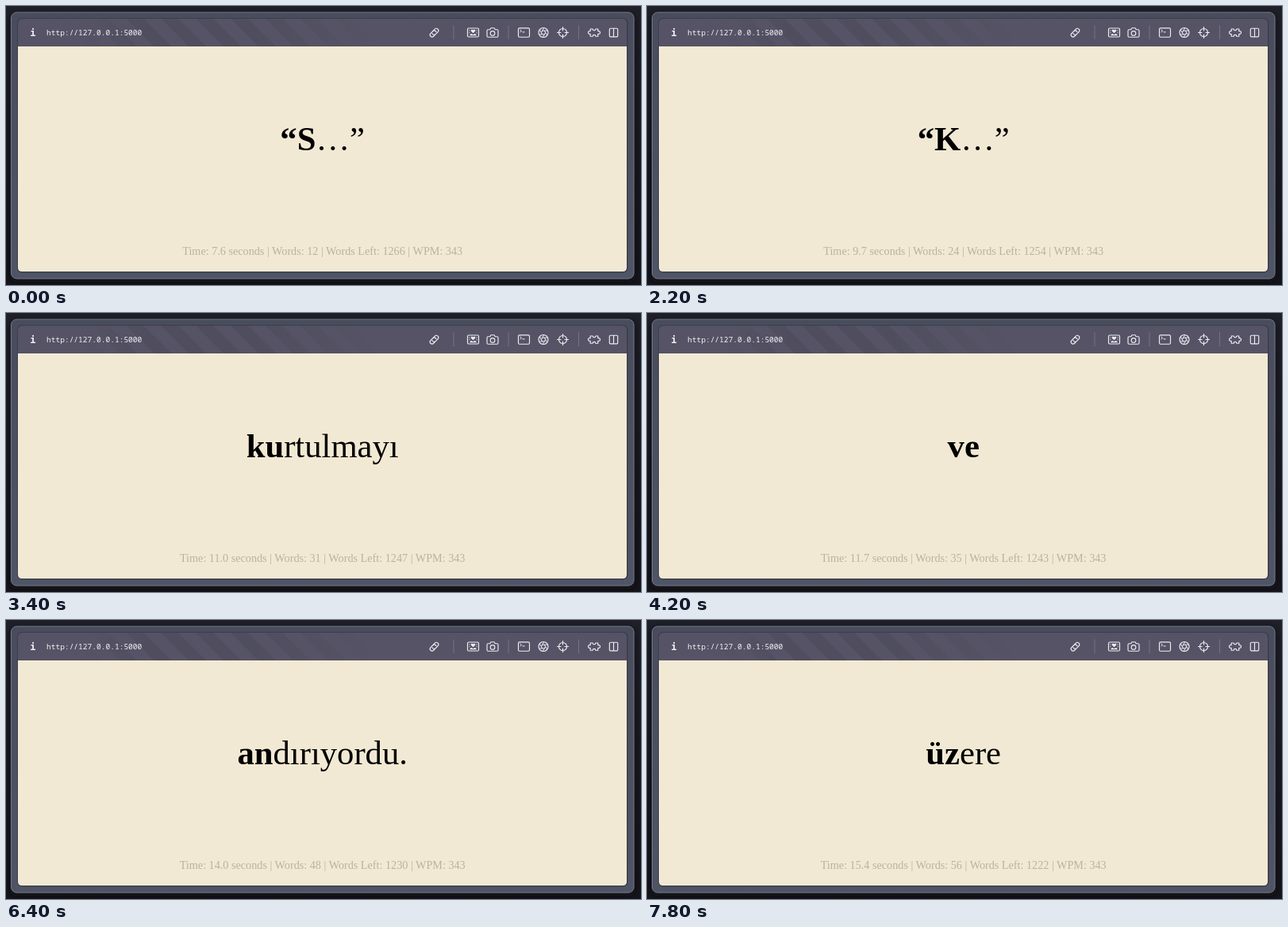
Write an HTML page that moves like this. It is 800x352 px and loops after 8000 ms.

```html
<!DOCTYPE html>
<html lang="tr">
<head>
<meta charset="utf-8">
<title>Speed reader</title>
<style>
html, body { margin: 0; width: 100%; height: 100%; overflow: hidden; background: #1b1b23; }
svg { display: block; width: 800px; height: 352px; }
.serif { font-family: "Liberation Serif", "Times New Roman", Times, serif; text-anchor: middle; }
.mono { font-family: "Noto Sans Mono", "DejaVu Sans Mono", monospace; fill: #f4f3f8; }
.bold { font-weight: 700; }
.icons { fill: none; stroke: #eeedf4; stroke-width: 1.15; stroke-linecap: round; stroke-linejoin: round; }
.solid { fill: #eeedf4; stroke: none; }
</style>
</head>
<body>
<svg viewBox="0 0 800 352">
  <defs>
    <linearGradient id="back" x2="0" y2="1">
      <stop stop-color="#20202a"/><stop offset="1" stop-color="#15151c"/>
    </linearGradient>
    <linearGradient id="frame" x2="0" y2="1">
      <stop stop-color="#484c5c"/><stop offset="1" stop-color="#4f5566"/>
    </linearGradient>
    <linearGradient id="fade">
      <stop offset=".1" stop-color="#fff" stop-opacity="0"/>
      <stop offset=".3" stop-color="#fff"/>
      <stop offset=".6" stop-color="#fff"/>
      <stop offset="1" stop-color="#fff" stop-opacity="0"/>
    </linearGradient>
    <mask id="soft"><rect x="60" y="16" width="400" height="35" fill="url(#fade)"/></mask>
    <pattern id="stripes" width="31" height="31" patternUnits="userSpaceOnUse" patternTransform="translate(4 0) rotate(-45)">
      <rect width="15.5" height="31" fill="#4d4c5c"/>
    </pattern>
    <filter id="blur" x="-5%" y="-5%" width="110%" height="110%"><feGaussianBlur stdDeviation="4"/></filter>
  </defs>

  <rect width="800" height="352" fill="url(#back)"/>
  <rect x="5" y="10" width="788" height="338" rx="8" fill="#0c0c11" opacity=".6" filter="url(#blur)"/>
  <rect x="6.5" y="8" width="784.5" height="336" rx="7" fill="url(#frame)" stroke="#747988"/>
  <rect x="14" y="15" width="769.5" height="321.5" rx="6" fill="#3b3e4c"/>
  <path d="M15 51V22q0-6 6-6H776q6 0 6 6V51Z" fill="#555365"/>
  <rect x="60" y="16" width="400" height="35" fill="url(#stripes)" mask="url(#soft)" opacity=".75"/>
  <path d="M15 51H782V330q0 5-5 5H20q-5 0-5-5Z" fill="#f2e9d4"/>

  <text class="mono bold" style="font-family:'DejaVu Sans Mono',monospace" x="30.3" y="38" font-size="12">i</text>
  <text class="mono" x="51" y="37.3" font-size="9.55" font-weight="500">http://127.0.0.1:5000</text>

  <path d="M564 24.5V42M633 24.5V42M721.5 24.5V42" stroke="#747284"/>
  <g class="icons">
    <g transform="translate(539.5 33.7) rotate(-45)">
      <path d="M-1.2 2.6H-3.8A2.6 2.6 0 0 1-3.8-2.6H.2A2.6 2.6 0 0 1 2.4 1.2"/>
      <path d="M1.2-2.6H3.8A2.6 2.6 0 0 1 3.8 2.6H-.2A2.6 2.6 0 0 1-2.4-1.2"/>
    </g>
    <g transform="translate(588.5 33.5)">
      <rect x="-7" y="-5.5" width="14" height="11" rx="1.5"/>
      <path class="solid" d="M0 .8L-2.7-1.7A1.5 1.5 0 0 1 0-3A1.5 1.5 0 0 1 2.7-1.7ZM-4.5 3.8Q-3 1-1.5 1.8L0 2.8L1.5 1.8Q3 1 4.5 3.8Z"/>
      <path d="M-4.6-2.6v.2M4.6-2.6v.2M-4.6 0v.2M4.6 0v.2"/>
    </g>
    <g transform="translate(613 33.7)">
      <path d="M-5.5-4H-3.2L-2-6H2L3.2-4H5.5Q7-4 7-2.5V4Q7 5.5 5.5 5.5H-5.5Q-7 5.5-7 4V-2.5Q-7-4-5.5-4Z"/>
      <circle cy=".7" r="2.8"/>
    </g>
    <g transform="translate(652.5 33.5)">
      <rect x="-7" y="-5.7" width="14" height="11.4" rx="1.5"/>
      <path d="M-4.6-3.3L-2.9-2L-4.6-.7M-1.6-.6H.7" stroke-width="1"/>
    </g>
    <g id="aperture" transform="translate(677 33.5)"><circle r="6"/></g>
    <g transform="translate(701.5 33.5)">
      <circle r="5"/>
      <path d="M0-7V-2.5M0 7V2.5M-7 0H-2.5M7 0H2.5"/>
    </g>
    <path transform="translate(741 33.5)" d="M-4.8-4.5H-1.8Q-1.8-2.6 0-2.6T1.8-4.5H4.8V-1.8Q7.5-2.3 7.5 0T4.8 1.8V4.7H1.8Q1.8 2.8 0 2.8T-1.8 4.7H-4.8V1.8Q-7.5 2.3-7.5 0T-4.8-1.8Z"/>
    <path transform="translate(765.5 33.5)" d="M-4-5.3H4Q5.2-5.3 5.2-4V4Q5.2 5.3 4 5.3H-4Q-5.2 5.3-5.2 4V-4Q-5.2-5.3-4-5.3ZM0-5.3V5.3"/>
  </g>

  <text class="serif" x="398.7" y="182" font-size="42.67"><tspan class="bold" id="head"></tspan><tspan id="tail"></tspan></text>
  <text class="serif" id="stats" x="398.7" y="314" font-size="14.2" fill="#b9b2a2"></text>
</svg>
<script>
const LOOP = 8000, TICK = 100, PACE = 177, LEAD = 44;
const FIRST = 12, TOTAL = 1278, START = 7.62;
const words = ("“S…” Sokağı’nda kiracı olarak kaldığı küçük odasından çıktı ve ağır, kararsız adımlarla " +
  "“K…” Köprüsü’ne doğru yürüdü. Ev sahibesiyle karşılaşmaktan kurtulmayı başarmıştı. " +
  "Odası, yüksek ve beş katlı bir evin tam çatı katındaydı; bir odadan daha çok dolabı andırıyordu. " +
  "Bu odayı yemek ve hizmet dahil olmak üzere").split(" ");
const el = id => document.getElementById(id);

// Shutter blades of the aperture icon
const blades = [...Array(6).keys()].map(i =>
  `<path d="M-1.3-2.3H4.8" stroke-width=".9" transform="rotate(${i * 60})"/>`);
el("aperture").insertAdjacentHTML("beforeend", blades.join(""));

let shown = -1;
function draw(now) {
  const t = Math.floor((now % LOOP) / TICK) * TICK;
  const i = Math.min(words.length - 1, Math.floor((t + LEAD) / PACE));
  if (i !== shown) {
    shown = i;
    const count = FIRST + i;
    const secs = (START + i * PACE / 1000).toFixed(1);
    el("head").textContent = words[i].slice(0, 2);
    el("tail").textContent = words[i].slice(2);
    el("stats").textContent =
      `Time: ${secs} seconds | Words: ${count} | Words Left: ${TOTAL - count} | WPM: 343`;
  }
}
const begin = performance.now();
function loop() {
  draw(performance.now() - begin);
  requestAnimationFrame(loop);
}
loop();
</script>
</body>
</html>
```
